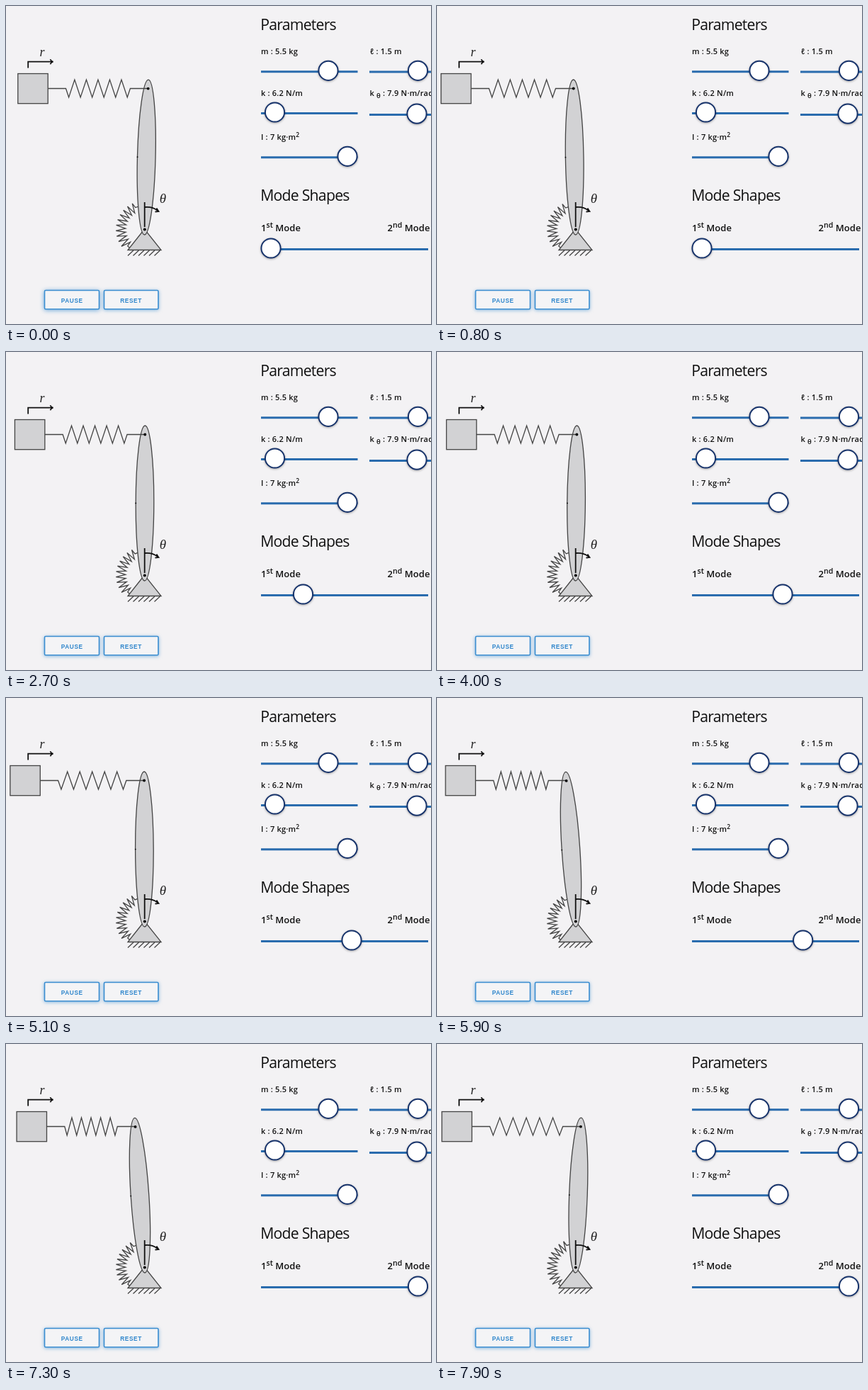
These frames come from a looping animation (600 by 449 pixels, 8 s). An HTML page:

```html
<!DOCTYPE html>
<html lang="en">
<head>
<meta charset="utf-8">
<title>Mode shapes</title>
<style>
html, body { margin: 0; width: 100%; height: 100%; overflow: hidden; background: #f3f2f4; }
svg { display: block; width: 100%; height: 100%; }
text { font-family: "Open Sans", "Noto Sans", sans-serif; fill: #111; }
.head { font-size: 21.2px; letter-spacing: -.75px; }
.label { font-size: 11px; font-weight: 600; letter-spacing: .2px; }
.mode { font-size: 13px; font-weight: 600; letter-spacing: .05px; }
.math { font: italic 18px "Liberation Serif", serif; fill: #222; }
.track { stroke: #2a6cae; stroke-width: 3; }
.thumb { fill: #fff; stroke: #17336b; stroke-width: 2; filter: drop-shadow(0 1px 1.5px #0005); }
.part { fill: #d2d2d4; stroke: #444; stroke-width: 1.3; }
.wire { fill: none; stroke: #444; stroke-width: 1.3; }
.arrow { fill: none; stroke: #111; stroke-width: 1.8; }
.button rect { fill: #f4f4f6; stroke: #3a8dd0; stroke-width: 1.6; filter: drop-shadow(0 1px 2.5px #3a8dd099); }
.button text { font: bold 8.3px "Liberation Sans", sans-serif; letter-spacing: .6px; fill: #2f86cc; text-anchor: middle; }
.button.hot rect { filter: drop-shadow(0 1px 3px #3a8dd0bb); }
.hot.track { filter: drop-shadow(0 0 2px #3a9be0); }
</style>
</head>
<body>
<svg viewBox="0 0 600 449" preserveAspectRatio="none">
  <path class="wire" id="coil"/>
  <path class="part" d="M195.5 315L172 344.5H219Z"/>
  <path class="wire" id="ground"/>
  <g id="rod">
    <ellipse class="part" cx="195.7" cy="213.5" rx="12.8" ry="109.5"/>
    <circle cx="183" cy="213.5" r=".9"/>
  </g>
  <path class="wire" id="spring"/>
  <rect class="part" id="mass" y="95.5" width="42.4" height="42.2"/>
  <circle id="tip" r="1.9"/>
  <circle cx="195.8" cy="315.5" r="2"/>
  <path class="arrow" d="M195.7 277V312M196 284Q207 283 214 289M210.5 290.5L215.5 290L212.5 285.500"/>
  <path class="arrow" d="M31.2 87.5V78.7H66M62.5 75.2Q63.5 78 66.5 78.7Q63.5 79.4 62.5 82.2"/>
  <text class="math" x="47.5" y="71">r</text>
  <text class="math" x="216.7" y="277.5" style="font-size:19px">θ</text>

  <g class="button" id="pause"><rect x="54.5" y="401.5" width="77" height="26.500" rx="1.5"/><text x="93.2" y="419">PAUSE</text></g>
  <g class="button"><rect x="138.5" y="401.5" width="76.5" height="26.500" rx="1.5"/><text x="176.5" y="419">RESET</text></g>

  <text class="head" x="359.2" y="33.700">Parameters</text>
  <text class="head" x="359.2" y="274.700">Mode Shapes</text>
  <text class="label" x="360" y="67.5">m : 5.5 kg</text>
  <text class="label" x="513.5" y="67.5">ℓ : 1.5 m</text>
  <text class="label" x="360" y="126.5">k : 6.2 N/m</text>
  <text class="label" x="513.5" y="126.5">k <tspan dy="3.5" font-size="9.5">θ</tspan><tspan dy="-3.5"> : 7.9 N·m/rad</tspan></text>
  <text class="label" x="360" y="188.5">I : 7 kg·m<tspan dy="-4" font-size="8.5">2</tspan></text>
  <text class="mode" x="360" y="318">1<tspan dy="-5" font-size="10.5">st</tspan><tspan dy="5"> Mode</tspan></text>
  <text class="mode" x="538.5" y="318">2<tspan dy="-5" font-size="10.5">nd</tspan><tspan dy="5"> Mode</tspan></text>
  <g id="sliders"></g>
</svg>
<script>
const $ = id => document.getElementById(id);

// left, right, track y, thumb x, thumb y
const sliders = [
  [360, 496.5, 92.8, 455, 91.3], [513, 650, 93, 581.5, 91.3],
  [360, 496.5, 151.4, 379.5, 150], [513, 650, 153.5, 580, 152.2],
  [360, 496.5, 213.7, 482, 212.3], [360, 596, 343.4, 374, 342]
];
$('sliders').innerHTML = sliders.map(([a, b, y, x, ty]) =>
  `<path class="track" d="M${a} ${y}H${b}"/><circle class="thumb" cx="${x}" cy="${ty}" r="13.6"/>`).join('');
const modeThumb = $('sliders').lastElementChild;
const modeTrack = modeThumb.previousElementSibling;

$('ground').setAttribute('d', Array.from({length: 6}, (_, i) => `M${180 + i * 7.5} 345l-8 7.5`).join(''));

const clamp = (v, a, b) => Math.min(b, Math.max(a, v));
const path = pts => 'M' + pts.map(p => p.map(v => v.toFixed(2)).join(' ')).join('L');

const thumbKeys = [[1.95, 374], [2.7, 419.5], [3.75, 488], [5.4, 488], [6.7, 562.5], [7.03, 581.5]];
function thumbAt(t) {
  let x = thumbKeys[0][1];
  for (let i = 1; i < thumbKeys.length; i++) {
    const [t0, x0] = thumbKeys[i - 1], [t1, x1] = thumbKeys[i];
    x += (x1 - x0) * clamp((t - t0) / (t1 - t0), 0, 1);
  }
  return x;
}

// The simulation runs slower while the slider is dragged.
const simTime = t => t - .2 * (clamp(t, 1.95, 3.75) - 1.95 + clamp(t, 5.45, 6.75) - 5.45);

function springPath(x0, x1) {
  const n = 11, a = x0 + 25.3, b = x1 - 25.3, pts = [[x0, 116.5], [a, 116.5]];
  for (let i = 0; i < n; i++) pts.push([a + (b - a) * (i + .5) / n, i % 2 ? 104 : 129]);
  return path([...pts, [b, 116.5], [x1, 116.5]]);
}

function coilPath(theta) {
  const start = 253.5 * Math.PI / 180 + theta, end = 128 * Math.PI / 180, n = 20;
  const at = (u, r) => {
    const a = start + (end - start) * u;
    return [195.7 + r * Math.cos(a), 315.5 + r * Math.sin(a)];
  };
  const pts = [at(0, 33.5), at(.06, 33.5)];
  for (let i = 0; i < n; i++) pts.push(at(.06 + .88 * (i + .5) / n, i % 2 ? 27 : 40.5));
  return path([...pts, at(.94, 33.5), at(1, 33.5)]);
}

function draw(t) {
  const thumb = thumbAt(t), mix = (thumb - 374) / 207.5, s = simTime(t);
  const q1 = (1 - mix) * 9 * Math.cos(.68 + 1.708 * s);
  const q2 = mix * 7 * Math.cos(5 + 5.943 * s);
  const box = 9.8 + q1 + q2, swing = .712 * q1 - 2.48 * q2;
  const theta = Math.asin(swing / 199.5), tipX = 195.7 + swing;
  $('mass').setAttribute('x', box);
  $('tip').setAttribute('cx', tipX);
  $('tip').setAttribute('cy', 316 - 199.5 * Math.cos(theta));
  $('rod').setAttribute('transform', `rotate(${theta * 180 / Math.PI} 195.7 316)`);
  $('spring').setAttribute('d', springPath(box + 42.4, tipX));
  $('coil').setAttribute('d', coilPath(theta));
  modeThumb.setAttribute('cx', thumb);
  modeTrack.classList.toggle('hot', t > 1.55 && t < 1.95);
  $('pause').classList.toggle('hot', t < .5);
}

const began = performance.now();
function tick() {
  const ms = (performance.now() - began) % 8000;
  draw(Math.floor(ms / 100) / 10);
  requestAnimationFrame(tick);
}
tick();
</script>
</body>
</html>
```
